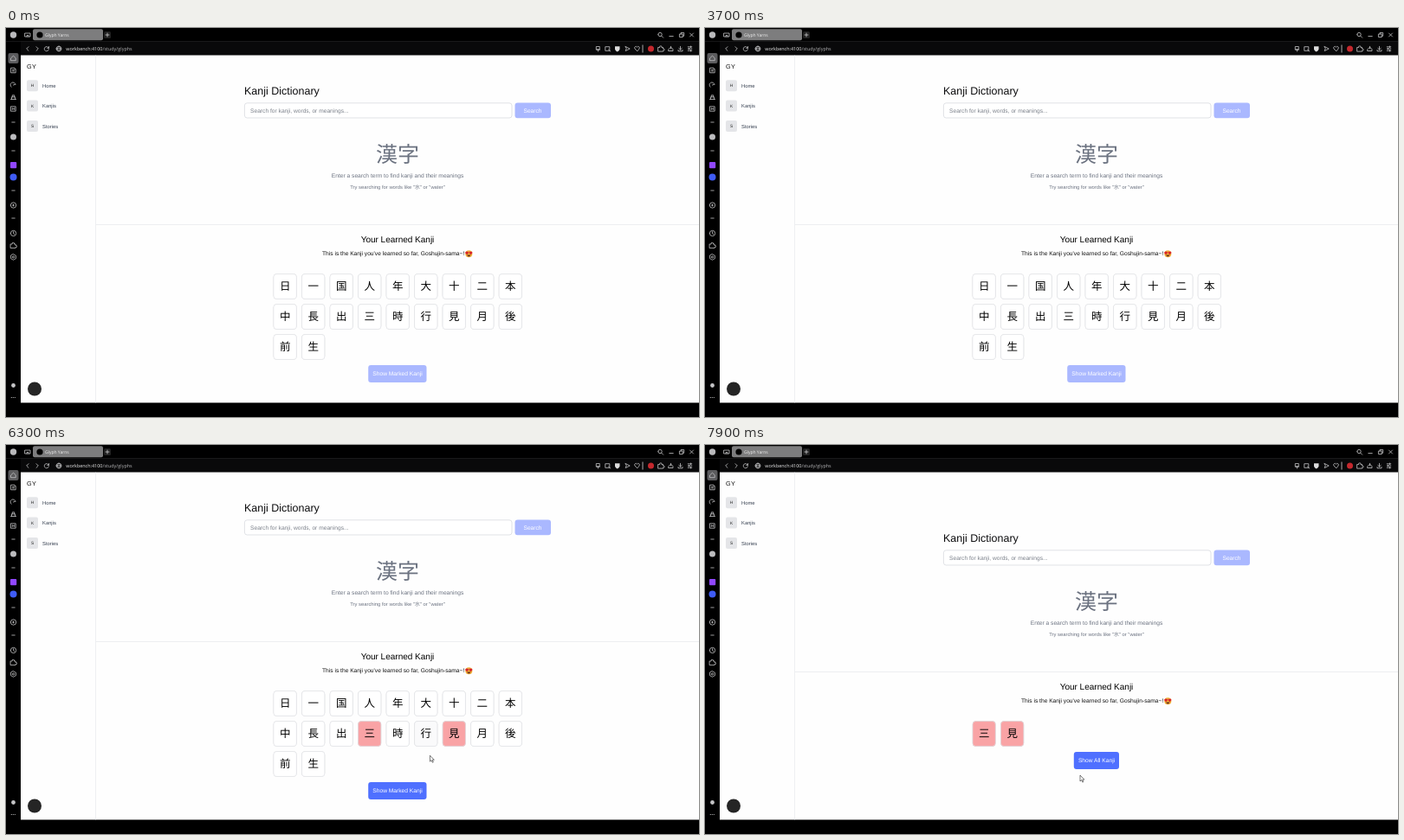
An HTML page for the animation above (8 s loop, 800x450 px).

```html
<!DOCTYPE html>
<html lang="en">
<head>
<meta charset="utf-8">
<style>
html, body { margin: 0; width: 100%; height: 100%; overflow: hidden; background: #000; }
svg { display: block; width: 800px; height: 450px; }
text { font: 6.67px "Liberation Sans", Arial, sans-serif; white-space: pre; text-rendering: geometricPrecision; }
.jp { font-family: "Noto Sans CJK JP", "Noto Sans CJK", sans-serif; }
.ui { font-family: "Open Sans", sans-serif; }
.icon { fill: none; stroke: #c4c4c6; stroke-width: .8; stroke-linecap: round; stroke-linejoin: round; }
.cell rect { stroke: #e2e4e9; stroke-width: .6; filter: drop-shadow(0 .8px .7px #0003); }
</style>
</head>
<body>
<svg id="stage" viewBox="0 0 800 450"></svg>
<script>
const stage = document.getElementById('stage');
const KANJI = [...'日一国人年大十二本中長出三時行見月後前生'];
const WHITE = [255, 255, 255], GREY = [229, 231, 235], PINK = [249, 163, 165];
const PALE = [170, 184, 255], BLUE = [79, 112, 255], DEEP = [70, 100, 236];
const FILTER_AT = 6960, FADE = 150;
const MARKED_AT = { 12: 4850, 15: 5850, 0: 7000, 1: 7000 };
// Pointer path: time, x, y
const PATH = [
  [4150, 452, 378], [4300, 424.5, 335], [5050, 424.5, 335], [5400, 503, 337],
  [5600, 503, 337], [5750, 515, 336], [6050, 515, 336], [6200, 497, 346],
  [6300, 489.5, 359], [6420, 481, 377], [6500, 478, 380], [6800, 458, 399],
  [7700, 458, 399], [7900, 433, 382]
];

const rect = (x, y, w, h, fill, r = 0, extra = '') =>
  `<rect x="${x}" y="${y}" width="${w}" height="${h}" rx="${r}" fill="${fill}" ${extra}/>`;
const circle = (x, y, r, fill) => `<circle cx="${x}" cy="${y}" r="${r}" fill="${fill}"/>`;
const text = (x, y, s, fill, size = 6.67, extra = '') =>
  `<text x="${x}" y="${y}" fill="${fill}" style="font-size:${size}px" ${extra}>${s}</text>`;
const icon = (x, y, d) => `<path class="icon" transform="translate(${x} ${y})" d="${d}"/>`;
const MID = 'text-anchor="middle"', BOLD = 'font-weight="700"';
const ring = r => `M${-r} 0a${r} ${r} 0 1 1 ${2 * r} 0a${r} ${r} 0 1 1 ${-2 * r} 0`;
const box = r => `M${-r} ${-r}h${2 * r}v${2 * r}h${-2 * r}z`;
const PUZZLE = 'M-3 -1.5h1.7a1.2 1.2 0 1 1 2.2 0h1.6v1.6a1.1 1.1 0 1 1 0 2v1h-5.5z';

const browser = () =>
  rect(0, 0, 800, 450, '#000') + rect(17, 15, 783, 17, '#09090a') +
  rect(0, 15, 800, .6, '#242426') + rect(31, 1.3, 81, 13, '#7d7d7e', 2) +
  circle(8.5, 8, 3.7, '#b9b9bb') +
  icon(25, 8, 'M-3 -2h6v4h-6zM-1 2v-1.5h2v1.5') + circle(39, 8, 3.6, '#000') +
  text(45, 9.8, 'Glyph Yarns', '#f4f4f4', 5, 'class="ui"') +
  icon(117, 8, 'M-2 0h4M0 -2v4') + rect(113, 4, 8, 8, '#fff2', 1.5) +
  icon(755, 7.5, ring(2.2) + 'M1.7 1.7l2 2') + icon(768, 8, 'M-2.2 1.5h4.4') +
  icon(780, 8, 'M-2.2 -1h3.5v3.5h-3.5zM-1 -1v-1.5h3.7v3.7h-1.4') +
  icon(791.5, 8, 'M-2 -2l4 4M2 -2l-4 4') +
  icon(25, 24, 'M1 -2.3l-2.3 2.3l2.3 2.3') + icon(36, 24, 'M-1 -2.3l2.3 2.3l-2.3 2.3') +
  icon(47, 24, 'M2.3 -.8a2.6 2.6 0 1 0 .1 1.6M2.5 -2.5v1.8h-1.8') +
  icon(61, 24, ring(2.9) + 'M-2.9 0h5.8M0 -2.9c-2 2-2 4 0 5.8c2-2 2-4 0-5.8') +
  text(69.3, 25.7, 'workbench:4100<tspan fill="#b4b4b6">/study/glyphs</tspan>', '#eee', 5.45, 'class="ui"') +
  icon(683.5, 24, 'M-1.8 -2.5h3.6v3.5h-3.6zM0 1v2M-2 1h4') +
  icon(694.5, 24, box(2.3) + 'M1 1l2.3 2') +
  `<path d="M703 21.2h5.5v3q-.4 2.4-2.8 3.2q-2.4-.8-2.7-3.2z" fill="#ddd"/>` +
  icon(717.5, 24, 'M-2.3 -2.5l5 2.5l-5 2.5l.9-2.5z') +
  icon(728.5, 24, 'M0 2.6l-2.6-2.7a1.5 1.5 0 0 1 2.6-1.8a1.5 1.5 0 0 1 2.6 1.8z') +
  rect(734.5, 19.5, 1, 9, '#aaa') + circle(744.5, 24, 3.5, '#c5282d') +
  icon(756, 24, PUZZLE) + icon(767.5, 24, 'M-2.5 2.5h5v-2l-2.5-2.3l-2.5 2.3zM0 -.2v-2.5') +
  icon(778.5, 24, 'M0 -2.7v3.7M-1.7 -.5l1.7 1.6l1.7-1.6M-2.5 1.5v1.3h5v-1.3') +
  icon(789.5, 24, 'M-2.3 -2.2h4.6M-2.3 0h4.6M-2.3 2.2h4.6M1 -3v1.6M-1 -.8v1.6M1 1.4v1.6');

const dock = () =>
  rect(2.5, 29, 12, 12, '#5b5b5d', 2) +
  icon(8.5, 35, 'M-2.7 -.3l2.7-2.5l2.7 2.5v3h-5.4z') +
  icon(8.5, 49, 'M-2.5 -2.8h4v1.2h1.2v4.4h-5.2zM-1 -.5h2M-1 1h2') +
  icon(8.5, 66, 'M-2.4 2.2a3 3 0 1 1 4.9-2.8M0 0l2-.8') +
  icon(8.5, 80, 'M-3 2.5h6M-2 2.2v-2.4h4v2.4M-1.2 -.2v-2h2.4v2') +
  icon(8.5, 93.5, box(2.7) + 'M-1.2 1v-2l1.2 1l1.2-1v2') +
  [109, 142, 188, 220].map(y => icon(8.5, y, 'M-1.7 0h3.4')).join('') +
  circle(8.5, 126, 3.5, '#bcbcbe') +
  rect(5, 155, 7.2, 7.2, '#9147ff', 1) + circle(8.5, 172.5, 4, '#3f5cf5') +
  icon(8.5, 205, ring(3.2) + 'M0 -1v2M-1 0h2') +
  icon(8.5, 237.5, ring(3.2) + 'M0 -1.8v2l1.3 .8') + icon(8.5, 251.5, PUZZLE) +
  icon(8.5, 265, 'M0 -3.3l2.9 1.6v3.4l-2.9 1.6l-2.9-1.6v-3.4z' + ring(1.1)) +
  circle(8.5, 413.5, 2.4, '#c4c4c6') +
  [6.3, 8.3, 10.3].map(x => circle(x, 427.5, .6, '#ccc')).join('');

const sidebar = () =>
  rect(17, 31.5, 783, 402, '#fefefe') + rect(103.3, 31.5, .6, 402, '#e2e4e9') +
  text(24, 46.6, 'GY', '#111', 7.2, BOLD + ' letter-spacing=".3"') +
  ['Home', 'Kanjis', 'Stories'].map((label, i) => {
    const y = 60.2 + i * 23.4;
    return rect(24, y, 13, 13, '#e4e5e8', 2) +
      text(30.5, y + 8.2, label[0], '#222', 4.8, MID + ' ' + BOLD) +
      text(42, y + 8.6, label, '#374151', 5.83);
  }).join('') + circle(33, 417.5, 8, '#252525');

const emoji = (x, y) => {
  const heart = dx => `<path d="M${x + dx} ${y + 1}l-1.7-1.8a1 1 0 0 1 1.7-1.3a1 1 0 0 1 1.7 1.3z" fill="#d8262c"/>`;
  return circle(x, y, 4, '#efad38') + heart(-2.2) + heart(2.2) +
    `<path d="M${x - 2} ${y + 1.2}h4q-.4 2-2 2q-1.6 0-2-2z" fill="#67331d"/>`;
};

const search = () =>
  text(275, 76.6, 'Kanji Dictionary', '#0b0b0d', 12.5, BOLD) +
  rect(275.4, 86.8, 308.6, 17.2, '#fff', 3, 'stroke="#d3d6dc" stroke-width=".7"') +
  text(282, 97.7, 'Search for kanji, words, or meanings...', '#7b808a') +
  rect(587.5, 86.5, 41.5, 17.7, `rgb(${PALE})`, 3) + text(608, 97.7, 'Search', '#fff', 6.67, MID) +
  text(452, 155.2, '漢字', '#6b7280', 25, MID + ' class="jp"') +
  text(452, 172.9, 'Enter a search term to find kanji and their meanings', '#6b7280', 6.67, MID) +
  text(452, 185.5, 'Try searching for words like "<tspan class="jp">水</tspan>" or "water"', '#6b7280', 5.83, MID) +
  rect(104, 227.3, 696, .6, '#e2e4e9') +
  text(452, 248, 'Your Learned Kanji', '#000', 10, MID + ' ' + BOLD) +
  text(365, 263.4, "This is the Kanji you've learned so far, Goshujin-sama~!", '#111') + emoji(534.3, 261.2);

const cellX = i => 309 + (i % 9) * 32.52;
const cellY = (i, filtered) => 284.6 + (filtered ? 35 : Math.floor(i / 9) * 35);
const cells = KANJI.map((k, i) =>
  `<g class="cell">${rect(0, 0, 26.3, 28.8, '#fff', 3.5)}${text(13.15, 18.9, k, '#000', 12.5, MID + ' class="jp"')}</g>`).join('');

stage.innerHTML = browser() + dock() + sidebar() + `<g id="top">${search()}</g>` + cells +
  `<g id="button">${rect(0, 0, 0, 20, '#fff', 3)}${text(452, 0, '', '#fff', 6.67, MID)}</g>` +
  `<g id="pointer" stroke="#222" stroke-width=".6" stroke-linejoin="round">
    <path id="arrow" fill="#fff" d="M0 0v7l1.6-1.5l1.2 2.6l1.1-.5l-1.2-2.5h2.2z"/>
    <path id="hand" fill="#fff" d="M-.8 .3q.8-1 1.6 0v3l1.1-.2l1 .4l1 .3q.9.3.7 1.5l-.6 3.2h-4.2l-2.6-3.6q-.1-1 .9-.6l1.1 1z"/>
  </g>`;

const [topBlock, button, pointer, arrow, hand] =
  ['top', 'button', 'pointer', 'arrow', 'hand'].map(id => document.getElementById(id));
const cellNodes = [...document.querySelectorAll('.cell')];

function pointerAt(t) {
  if (t < PATH[0][0]) return [-99, -99];
  const n = PATH.findIndex(p => p[0] > t);
  if (n < 0) return PATH.at(-1).slice(1);
  const [t0, x0, y0] = PATH[n - 1], [t1, x1, y1] = PATH[n], k = (t - t0) / (t1 - t0);
  return [x0 + (x1 - x0) * k, y0 + (y1 - y0) * k];
}
const inside = ([px, py], x, y, w, h) => px >= x && px <= x + w && py >= y && py <= y + h;
const isShown = (i, t) => t < FILTER_AT || i < 2;
const overCell = (i, t) => isShown(i, t) && inside(pointerAt(t), cellX(i), cellY(i, t >= FILTER_AT), 26.3, 28.8);
const buttonBox = t => t < FILTER_AT ? [418.2, 390, 67.3, 20] : [425.8, 355, 52.2, 20];
const overButton = t => inside(pointerAt(t), ...buttonBox(t));

const cellColor = (i, t) => t >= MARKED_AT[i] ? PINK : overCell(i, t) ? GREY : WHITE;
const buttonColor = t => t < MARKED_AT[12] ? PALE : overButton(t) ? DEEP : BLUE;
// Averaging the recent past gives a linear colour transition.
function faded(colorAt, t) {
  const steps = 10, sum = [0, 0, 0];
  for (let k = 0; k < steps; k++) colorAt(t - k * FADE / steps).forEach((v, c) => sum[c] += v / steps);
  return `rgb(${sum.map(Math.round)})`;
}

function draw(t) {
  const filtered = t >= FILTER_AT;
  topBlock.setAttribute('transform', `translate(0 ${filtered ? 35 : 0})`);
  cellNodes.forEach((node, i) => {
    node.style.display = isShown(i, t) ? '' : 'none';
    node.setAttribute('transform', `translate(${cellX(i)} ${cellY(i, filtered)})`);
    node.firstChild.setAttribute('fill', faded(u => cellColor(i, u), t));
    node.lastChild.textContent = KANJI[filtered && i < 2 ? [12, 15][i] : i];
  });

  const [x, y, w] = buttonBox(t), [plate, label] = button.children;
  plate.setAttribute('x', x);
  plate.setAttribute('y', y);
  plate.setAttribute('width', w);
  plate.setAttribute('fill', faded(buttonColor, t));
  label.setAttribute('y', y + 12.3);
  label.textContent = filtered ? 'Show All Kanji' : 'Show Marked Kanji';

  const clickable = overButton(t) || KANJI.some((_, i) => overCell(i, t));
  pointer.setAttribute('transform', `translate(${pointerAt(t)})`);
  arrow.style.display = clickable ? 'none' : '';
  hand.style.display = clickable ? '' : 'none';
}

function frame() {
  draw(performance.now() % 8000);
  requestAnimationFrame(frame);
}
frame();
</script>
</body>
</html>
```
